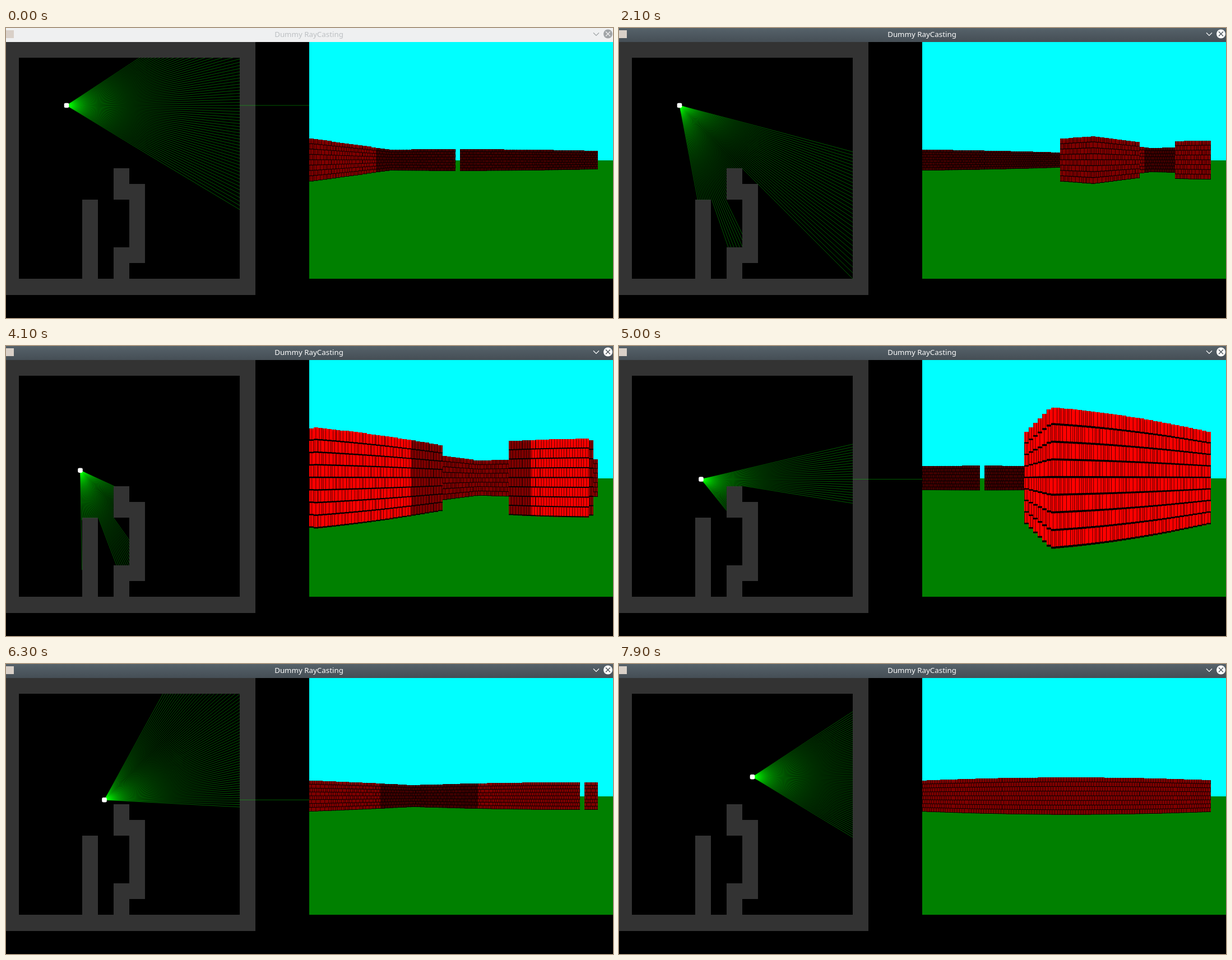
Animation of 1083x517 px, one loop 8000 ms. Source, as an HTML page with a canvas:

```html
<!DOCTYPE html>
<html lang="en">
<head>
<meta charset="utf-8">
<title>Dummy RayCasting</title>
<style>
  html, body { margin: 0; width: 100%; height: 100%; overflow: hidden; background: #000; }
  canvas { display: block; width: 1083px; height: 517px; }
</style>
</head>
<body>
<canvas id="stage" width="1083" height="517"></canvas>
<script>
const ctx = document.getElementById('stage').getContext('2d');
const LOOP = 8000, STEP = 100;
const SCALE = 0.88, CELL = 32 * SCALE, MAP_X = -5.2, MAP_Y = 24.8, MAP_SIZE = 16;
const VIEW_X = 541, TITLE_H = 25, HORIZON = 236;
const RAYS = 65, FIRST_ANGLE = -33, COLUMN = 9 * SCALE;
const WALL_K = 15360 * SCALE * SCALE;      // wall height times distance
const BRICK_ROWS = 8, BRICK_W = 5;         // brick width in texels

// Inner walls as [column, row, width, height] in cells
const WALLS = [[5, 10, 1, 5], [7, 8, 1, 2], [7, 13, 1, 2], [8, 9, 1, 5]];

// [time, x, y, heading in degrees]
const PATH = [
  [600, 108, 138, 0], [1500, 108, 138, 28], [2100, 108, 138, 48],
  [2400, 108, 138, 57], [2900, 108, 138, 78], [3200, 110.5, 150.3, 78],
  [3700, 119.8, 192, 78], [4100, 132.5, 221.7, 58], [4200, 137.2, 229, 53],
  [4400, 146.5, 237.5, 45], [5000, 146.5, 237.5, 20], [5100, 155, 240.5, 20],
  [5300, 172, 243, 10], [6000, 172, 243, -13], [6300, 175.5, 242.3, -28],
  [6400, 175.5, 242.3, -33], [6900, 212, 218.4, -33], [7300, 238, 201.3, -33],
  [7800, 238, 201.3, -4.5], [7900, 238, 201.3, -0.01]
];

function rect(color, x, y, w, h) {
  ctx.fillStyle = color;
  ctx.fillRect(x, y, w, h);
}

function line(color, width, ...points) {
  ctx.strokeStyle = color;
  ctx.lineWidth = width;
  ctx.beginPath();
  points.forEach(([x, y]) => ctx.lineTo(x, y));
  ctx.stroke();
}

const mix = (a, b, k) => `rgb(${a.map((v, i) => Math.round(v + (b[i] - v) * k))})`;

function poseAt(t) {
  const next = PATH.findIndex(key => key[0] >= t);
  if (next <= 0) return PATH[next ? PATH.length - 1 : 0].slice(1);
  const a = PATH[next - 1], b = PATH[next];
  const k = (t - a[0]) / (b[0] - a[0]);
  return [1, 2, 3].map(i => a[i] + (b[i] - a[i]) * k);
}

function solid(c, r) {
  return c < 1 || r < 1 || c > MAP_SIZE - 2 || r > MAP_SIZE - 2 ||
    WALLS.some(([x, y, w, h]) => c >= x && c < x + w && r >= y && r < y + h);
}

// Walks the grid cell by cell; returns distance and position along the wall face
function cast(x, y, angle) {
  const dx = Math.cos(angle), dy = Math.sin(angle);
  const gx = (x - MAP_X) / CELL, gy = (y - MAP_Y) / CELL;
  let c = Math.floor(gx), r = Math.floor(gy), dist = 0, sideX = false;
  let nextX = (c + (dx > 0) - gx) / dx, nextY = (r + (dy > 0) - gy) / dy;
  while (!solid(c, r)) {
    sideX = nextX < nextY;
    if (sideX) {
      dist = nextX;
      nextX += Math.abs(1 / dx);
      c += Math.sign(dx);
    } else {
      dist = nextY;
      nextY += Math.abs(1 / dy);
      r += Math.sign(dy);
    }
  }
  const along = sideX ? gy + dy * dist : gx + dx * dist;
  return { dist: dist * CELL, texel: Math.floor(along * 32) };
}

function drawMap() {
  const inner = (MAP_SIZE - 2) * CELL;
  rect('#333', 0, TITLE_H, Math.round(MAP_X + MAP_SIZE * CELL), 451);
  rect('#000', 23, 53, Math.round(inner), Math.round(inner));
  for (const [c, r, w, h] of WALLS) {
    const x = Math.round(MAP_X + c * CELL), y = Math.round(MAP_Y + r * CELL);
    rect('#333', x, y, Math.round(MAP_X + (c + w) * CELL) - x, Math.round(MAP_Y + (r + h) * CELL) - y);
  }
}

function drawColumn(index, { dist, texel }) {
  const x = VIEW_X + index * COLUMN, h = WALL_K / dist, top = HORIZON - 0.6 - h / 2;
  const left = Math.round(x), width = Math.round(x + COLUMN) - left;
  const red = dist < 100 * SCALE ? 255 : dist < 300 * SCALE ? 128 : 64;
  const rowH = h / BRICK_ROWS, mortar = Math.max(0.9, h / 70);
  rect(`rgb(${red},0,0)`, left, Math.round(top), width, Math.round(top + h) - Math.round(top));
  for (let row = 0; row < BRICK_ROWS; row++) {
    const y = top + row * rowH;
    rect('#000', left, y + rowH - mortar, width, mortar);
    ctx.fillStyle = 'rgba(0,0,0,.75)';
    for (let i = 0; i < 9; i++) {
      if ((texel + i + (row % 2) * 2) % BRICK_W === 0) ctx.fillRect(x + i * SCALE, y, SCALE, rowH);
    }
  }
}

function drawTitle(active) {
  const bar = ctx.createLinearGradient(0, 0, 0, TITLE_H);
  bar.addColorStop(0, mix([239, 240, 241], [86, 98, 106], active));
  bar.addColorStop(1, mix([239, 240, 241], [69, 78, 85], active));
  rect(bar, 0, 0, 1083, TITLE_H);
  rect('#d9d0c8', 0, 4, 14, 14);

  ctx.font = '13.333px "Noto Sans", sans-serif';
  ctx.textAlign = 'center';
  ctx.fillStyle = mix([189, 192, 195], [252, 252, 252], active);
  ctx.fillText('Dummy RayCasting', 540.5, 16);

  const button = mix([160, 164, 167], [252, 252, 252], active);
  line(button, 1.2, [1048, 8.5], [1053, 13.5], [1058, 8.5]);
  ctx.fillStyle = button;
  ctx.beginPath();
  ctx.arc(1074, 10.5, 8, 0, 7);
  ctx.fill();
  const cross = mix([239, 240, 241], [71, 80, 87], active);
  line(cross, 1.2, [1070, 6.5], [1078, 14.5]);
  line(cross, 1.2, [1078, 6.5], [1070, 14.5]);
}

function draw(t) {
  const [x, y, heading] = poseAt(t);
  const rays = Array.from({ length: RAYS }, (_, i) => {
    const degrees = heading + FIRST_ANGLE + i, angle = degrees * Math.PI / 180;
    // A perfectly level ray slips past the wall
    const hit = degrees === 0 ? null : cast(x, y, angle);
    return { angle, hit };
  });
  const ahead = (angle, d) => [x + Math.cos(angle) * d, y + Math.sin(angle) * d];

  rect('#000', 0, 0, 1083, 517);
  drawMap();
  for (const { angle, hit } of rays) {
    line('rgba(0,255,0,.4)', SCALE, [x, y], ahead(angle, hit ? hit.dist : 600));
  }
  line('#0f0', 1, [x, y], ahead(heading * Math.PI / 180, 8.5));
  ctx.fillStyle = '#fff';
  ctx.beginPath();
  ctx.roundRect(x - 4.3, y - 4.3, 8.6, 8.6, 2.4);
  ctx.fill();

  rect('#0ff', VIEW_X, TITLE_H, 542, HORIZON - TITLE_H);
  rect('#008000', VIEW_X, HORIZON, 542, 447 - HORIZON);
  rays.forEach(({ hit }, i) => hit && drawColumn(i, hit));
  drawTitle(t < 200 ? 0 : t < 300 ? 0.5 : 1);
}

function frame() {
  const t = performance.now() % LOOP;
  draw(Math.floor(t / STEP) * STEP);
  requestAnimationFrame(frame);
}
frame();
</script>
</body>
</html>
```
